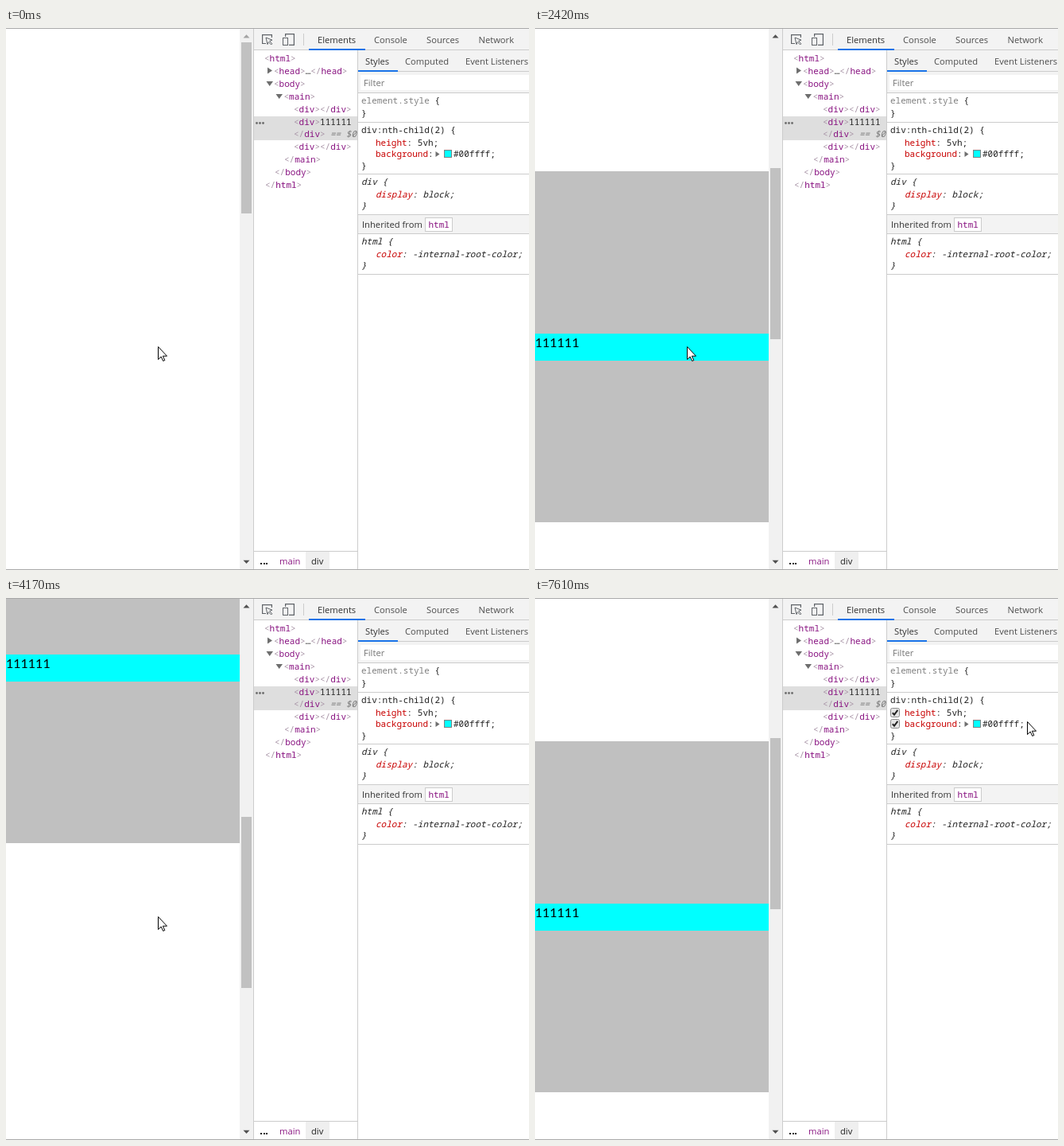
An HTML page that plays this animation: 658 by 681 pixels, repeating every 8 s.

```html
<!DOCTYPE html>
<html lang="en">
<head>
<meta charset="utf-8">
<title>Scroll and inspect</title>
<style>
html, body { margin: 0; width: 100%; height: 100%; overflow: hidden; background: #fff; }
svg { display: block; width: 658px; height: 681px; }
rect, .line { shape-rendering: crispEdges; }
text { white-space: pre; }

.ui { font: 11.2px "Open Sans", "Noto Sans", sans-serif; fill: #4d4d4d; }
.code { font: 11px "Noto Sans Mono", "DejaVu Sans Mono", monospace; fill: #222; }
.tree { fill: #a894a6; }
.tree tspan, .tag { fill: #881280; }
.tree .txt { fill: #222; }
.prop { fill: #c80000; }
.dim { fill: #808080; }
.it { font-style: italic; }
.line { stroke: #ccc; fill: none; }
.bar { fill: #f3f3f3; }
.blue { fill: #1a73e8; }
.num { font: 16px Lato, "Noto Sans", sans-serif; fill: #000; }

svg, .anim { animation: 8s step-end -4ms infinite; }
svg { --s: 0; --x: 191; --y: 400; animation-name: scroll, point; }
#page { transform: translateY(calc(var(--s) * -1px)); }
#thumb { transform: translateY(calc(var(--s) * .3165px)); }
#mouse { transform: translate(calc(var(--x) * 1px), calc(var(--y) * 1px)); }
#up { animation-name: up; }
#arrow { animation-name: arrow; }
#beam { animation-name: beam; }
#checks { animation-name: checks; }
#hover { animation-name: hover; }

@keyframes scroll {
  0% { --s: 0; }
  17.125% { --s: 50; }
  18.625% { --s: 123; }
  20.125% { --s: 200; }
  23.5% { --s: 250; }
  25% { --s: 321; }
  26.5% { --s: 399; }
  28.375% { --s: 400; }
  30.25% { --s: 500; }
  31.75% { --s: 598; }
  33.625% { --s: 698; }
  35.125% { --s: 788; }
  36.625% { --s: 870; }
  38.5% { --s: 972; }
  40% { --s: 1057; }
  41.875% { --s: 1100; }
  45% { --s: 1150; }
  46.875% { --s: 1220; }
  48.75% { --s: 1299; }
  50.625% { --s: 1020; }
  52.125% { --s: 813; }
  54% { --s: 720; }
  55.5% { --s: 700; }
  59% { --s: 605; }
  60.875%, 100% { --s: 500; }
}
@keyframes point {
  0% { --x: 191; --y: 400; }
  68.25% { --x: 203; --y: 371; }
  70.125% { --x: 243; --y: 324; }
  71.625% { --x: 289; --y: 273; }
  73.5% { --x: 449; --y: 180; }
  75.375% { --x: 560; --y: 172; }
  76.875% { --x: 646; --y: 164; }
  78.375% { --x: 632; --y: 151; }
  79.875% { --x: 598; --y: 138; }
  81.75% { --x: 600; --y: 124; }
  84.875% { --x: 607; --y: 120; }
  86.75% { --x: 602; --y: 117; }
  88.625% { --x: 608; --y: 132; }
  90.125% { --x: 614; --y: 148; }
  93.25% { --x: 618; --y: 155; }
  95.125%, 100% { --x: 619; --y: 155; }
}
@keyframes up { 0% { fill: #a3a3a3; } 17.125%, 100% { fill: #505050; } }
@keyframes arrow {
  0%, 86.75%, 93.25%, 100% { visibility: visible; }
  81.75%, 88.625% { visibility: hidden; }
}
@keyframes beam {
  0%, 86.75%, 93.25%, 100% { visibility: hidden; }
  81.75%, 88.625% { visibility: visible; }
}
@keyframes checks {
  0%, 86.75% { visibility: hidden; }
  75.375%, 88.625%, 100% { visibility: visible; }
}
@keyframes hover {
  0%, 76.875%, 100% { visibility: hidden; }
  75.375% { visibility: visible; }
}
</style>
</head>
<body>
<svg viewBox="0 0 658 681">
  <defs>
    <g id="check">
      <rect x=".5" y=".5" width="11" height="11" rx="2" fill="#e4e4e4" stroke="#8a8a8a" style="shape-rendering:auto"/>
      <path d="M2.8 6.2 5 8.6 9.3 2.8" fill="none" stroke="#222" stroke-width="2"/>
    </g>
  </defs>
  <rect width="658" height="681" fill="#fff"/>

  <!-- web page -->
  <g id="page">
    <rect y="680" width="294" height="441" fill="#c0c0c0"/>
    <rect y="884" width="294" height="34" fill="#0ff"/>
    <text class="num" x="0" y="901">111111</text>
  </g>

  <!-- scrollbar -->
  <rect x="294" width="17" height="681" fill="#f1f1f1"/>
  <rect id="thumb" x="296" y="17.55" width="13" height="215" fill="#c1c1c1"/>
  <path id="up" class="anim" d="M298.5 12.5 302.5 8.3 306.5 12.5Z"/>
  <path d="M298.5 668.7 302.5 673 306.5 668.7Z" fill="#505050"/>

  <!-- toolbar -->
  <rect x="311" width="347" height="681" fill="#fff"/>
  <rect class="bar" x="312" y="1" width="346" height="26"/>
  <path class="line" d="M311.5 0V681M312 27.5H658M374.5 7V22"/>
  <g fill="none" stroke="#5f6368" stroke-width="1.2">
    <path d="M327 19.5H322.6V8.6H334.4V12"/>
    <path d="M327 12 335 15.2 331.6 16.4 334.8 19.8 333.6 21 330.4 17.6 329 20.6Z" stroke-width="1"/>
    <path d="M351.6 11V7.6H362.4V21.4H356"/>
    <rect x="348.5" y="12.5" width="6" height="9"/>
  </g>
  <g class="ui">
    <text x="392" y="19" fill="#333">Elements</text>
    <text x="463" y="19">Console</text>
    <text x="529" y="19">Sources</text>
    <text x="594.5" y="19">Network</text>
  </g>
  <rect class="blue" x="381" y="26" width="71" height="2"/>

  <!-- element tree -->
  <rect x="312" y="111" width="130" height="30" fill="#dedede"/>
  <rect id="hover" class="anim" x="315" y="190" width="125" height="15" rx="2" fill="#ebf1fb"/>
  <g fill="#6e6e6e">
    <circle cx="315.5" cy="119.5" r="1.4"/>
    <circle cx="319.5" cy="119.5" r="1.4"/>
    <circle cx="323.5" cy="119.5" r="1.4"/>
    <path d="M329 49.5 335 53.5 329 57.5ZM327.5 67H336L331.7 73ZM339.5 83H348L343.7 89Z"/>
  </g>
  <g class="code tree">
    <text x="325" y="42">&lt;<tspan>html</tspan>&gt;</text>
    <text x="337" y="58">&lt;<tspan>head</tspan>&gt;<tspan class="txt">…</tspan>&lt;/<tspan>head</tspan>&gt;</text>
    <text x="337" y="74">&lt;<tspan>body</tspan>&gt;</text>
    <text x="349.5" y="90">&lt;<tspan>main</tspan>&gt;</text>
    <text x="362" y="106">&lt;<tspan>div</tspan>&gt;&lt;/<tspan>div</tspan>&gt;</text>
    <text x="362" y="122">&lt;<tspan>div</tspan>&gt;<tspan class="txt">111111</tspan></text>
    <text x="362" y="137">&lt;/<tspan>div</tspan>&gt;</text>
    <text x="408" y="137" class="it" fill="#777">== $0</text>
    <text x="362" y="153">&lt;<tspan>div</tspan>&gt;&lt;/<tspan>div</tspan>&gt;</text>
    <text x="350" y="169">&lt;/<tspan>main</tspan>&gt;</text>
    <text x="338" y="185">&lt;/<tspan>body</tspan>&gt;</text>
    <text x="326" y="201">&lt;/<tspan>html</tspan>&gt;</text>
  </g>

  <!-- breadcrumbs -->
  <rect x="377" y="658" width="30" height="23" fill="#efefef"/>
  <path class="line" d="M312 657.5H442M442.5 28V681"/>
  <g fill="#222">
    <rect x="320" y="672" width="2" height="2"/>
    <rect x="324" y="672" width="2" height="2"/>
    <rect x="327" y="672" width="2" height="2"/>
  </g>
  <g class="ui">
    <text class="tag" x="344" y="674">main</text>
    <text x="384" y="674" fill="#222">div</text>
  </g>

  <!-- styles pane -->
  <rect class="bar" x="443" y="28" width="215" height="53"/>
  <rect x="446" y="59" width="212" height="19" fill="#fff"/>
  <rect class="bar" x="443" y="235" width="215" height="23"/>
  <path class="line" d="M443 54.5H658M443 81.5H658M443 118.5H658M443 183.5H658M443 234.5H658M443 258.5H658M443 309.5H658"/>
  <rect class="blue" x="443" y="53" width="50" height="2"/>
  <rect x="527.5" y="238.5" width="34" height="17" fill="#fff" stroke="#ccc"/>
  <g class="ui">
    <text x="452" y="46" fill="#333">Styles</text>
    <text x="502" y="46">Computed</text>
    <text x="578" y="46">Event Listeners</text>
    <text x="450" y="73" fill="#757575">Filter</text>
    <text x="448" y="251" fill="#333">Inherited from</text>
  </g>
  <g class="code">
    <text x="447" y="95"><tspan class="dim">element.style</tspan> {</text>
    <text x="447" y="111">}</text>
    <text x="447" y="132">div:nth-child(2) {</text>
    <text x="465" y="148"><tspan class="prop">height</tspan>: 5vh;</text>
    <text x="465" y="162"><tspan class="prop">background</tspan>:</text>
    <text x="563" y="162">#00ffff;</text>
    <text x="447" y="177">}</text>
    <text class="tag" x="531.5" y="251">html</text>
    <g class="it">
      <text x="447" y="197">div {</text>
      <text x="465" y="213"><tspan class="prop">display</tspan>: block;</text>
      <text x="447" y="227">}</text>
      <text x="447" y="272">html {</text>
      <text x="465" y="288"><tspan class="prop">color</tspan>: -internal-root-color;</text>
      <text x="447" y="302">}</text>
    </g>
  </g>
  <path d="M540.5 155 545.5 158.5 540.5 162Z" fill="#6e6e6e"/>
  <rect x="551.5" y="153.5" width="9" height="9" fill="#0ff" stroke="#808080"/>
  <g id="checks" class="anim">
    <use href="#check" x="447" y="138"/>
    <use href="#check" x="447" y="152"/>
  </g>

  <path class="line" d="M0 .5H658M0 680.5H658" style="stroke:#a9a9a9"/>

  <!-- pointer -->
  <g id="mouse">
    <path id="arrow" class="anim" d="M.5 .5V16.5L4.2 13 6.7 18.4 8.8 17.5 6.4 12.2H11.5Z" fill="#fff" stroke="#000"/>
    <path id="beam" class="anim line" d="M0 .5H3M4 .5H7M3.5 1V15M0 15.5H3M4 15.5H7" style="stroke:#000"/>
  </g>
</svg>
</body>
</html>
```
